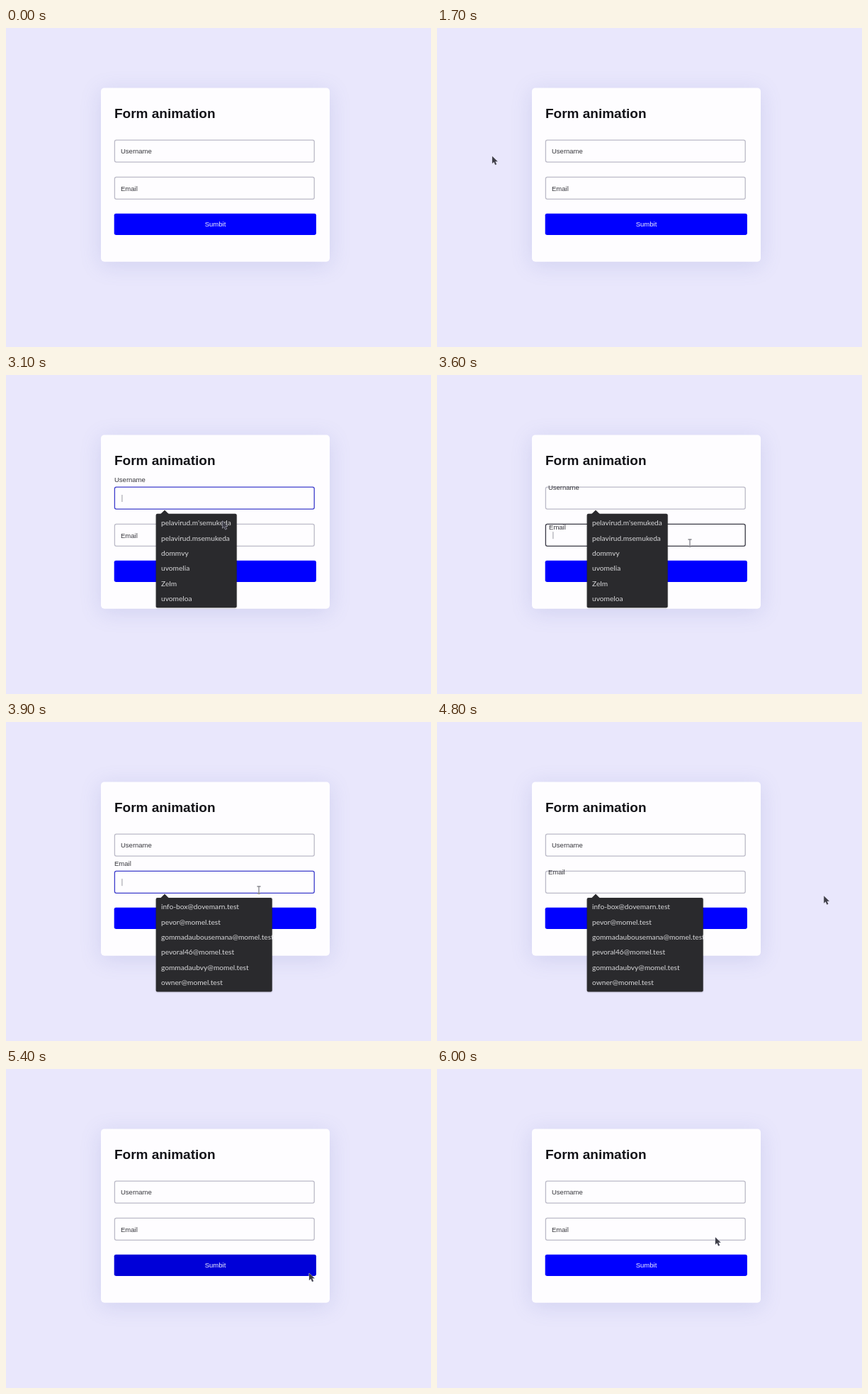
An HTML page with a canvas that plays this animation: 600x450 px, repeating every 6.1 s.

```html
<!DOCTYPE html>
<html lang="en">
<head>
<meta charset="utf-8">
<title>Form animation</title>
<style>
  html, body { margin: 0; width: 100%; height: 100%; overflow: hidden; background: #e9e7fc; }
  canvas { display: block; }
</style>
</head>
<body>
<canvas id="stage" width="600" height="450"></canvas>
<script>
const ctx = document.getElementById('stage').getContext('2d');
const LOOP = 6100, STEP = 100, FLOAT_TIME = 300, POPUP_DELAY = 110;
const SANS = '"Liberation Sans", Arial, sans-serif';
const INK = '#36363c', POPUP = '#2a2a2d';

const fields = [
  { label: 'Username', top: 158, focus: 2390, blur: 3525, popupWidth: 114,
    hints: ["pelavirud.m'semukeda", 'pelavirud.msemukeda', 'dommvy', 'uvomelia', 'Zelm', 'uvomeloa'] },
  { label: 'Email', top: 210.2, focus: 3525, blur: 4725, popupWidth: 164,
    hints: ['info-box@dovemarn.test', 'pevor@momel.test', 'gommadaubousemana@momel.test',
            'pevoral46@momel.test', 'gommadaubvy@momel.test', 'owner@momel.test'] }
];

// Pointer gestures, each starting where the last one ended
const APPEAR = 900;
const gestures = [
  { start: 900, end: 1000, x: 74, y: 185 },
  { start: 1600, end: 1700, x: 78, y: 181 },
  { start: 1700, end: 2000, x: 254, y: 175 },
  { start: 2800, end: 3400, x: 357, y: 237 },
  { start: 4100, end: 4600, x: 574, y: 240, lift: 137 },
  { start: 4700, end: 5000, x: 467, y: 261 },
  { start: 5000, end: 5400, x: 428, y: 288 },
  { start: 5400, end: 5500, x: 396, y: 288 },
  { start: 5700, end: 6000, x: 393, y: 237.5 }
];

const clamp = x => Math.min(1, Math.max(0, x));
const easeOut = x => 1 - (1 - clamp(x)) ** 2;
const smooth = x => clamp(x) ** 2 * (3 - 2 * clamp(x));

function pointerAt(t) {
  if (t < APPEAR) return null;
  let x = 100, y = 185;
  for (const g of gestures) {
    const k = smooth((t - g.start) / (g.end - g.start));
    x += (g.x - x) * k;
    y += (g.y - y) * k - (g.lift || 0) * Math.sin(Math.PI * k);
  }
  return { x, y };
}

function box(x, y, w, h, r, fill) {
  ctx.beginPath();
  ctx.roundRect(x, y, w, h, r);
  if (fill) {
    ctx.fillStyle = fill;
    ctx.fill();
  }
}

function text(str, x, y, font, color, align = 'left') {
  ctx.font = font;
  ctx.fillStyle = color;
  ctx.textAlign = align;
  ctx.fillText(str, x, y);
}

function shadow(color, blur, dy) {
  ctx.shadowColor = color;
  ctx.shadowBlur = blur;
  ctx.shadowOffsetY = dy;
}

function drawCard(hover) {
  ctx.fillStyle = '#e9e7fc';
  ctx.fillRect(0, 0, 600, 450);
  ctx.save();
  shadow('rgba(100, 110, 190, 0.18)', 30, 5);
  box(134, 84.4, 323, 245.4, 5, '#fefdff');
  ctx.restore();
  text('Form animation', 153, 127.4, 'bold 19px ' + SANS, '#131318');
  box(152.7, 261.8, 285.2, 30.2, 2.4, hover ? '#0000d8' : '#0000ff');
  text('Sumbit', 295.5, 280.2, '9.5px ' + SANS, '#f4f4ff', 'center');
}

function drawField({ label, top, focus, blur }, t) {
  const rise = easeOut((t - focus) / FLOAT_TIME) - easeOut((t - blur) / FLOAT_TIME);
  const focused = t >= focus && t < blur;
  box(153.4, top + 0.1, 281.8, 31, 2.4);
  ctx.lineWidth = 1.3;
  ctx.strokeStyle = !focused ? '#bbbac7' : rise > 0.95 ? '#3c3ccb' : '#3a3a45';
  ctx.stroke();
  text(label, 162 - 9 * rise, top + 19.4 - 26.8 * rise, '9.5px ' + SANS, INK);
  if (focused) {
    ctx.fillStyle = '#9a9aa3';
    ctx.fillRect(163.4, top + 11, 1, 10);
  }
}

function drawPopup({ top, focus, blur, popupWidth, hints }, t) {
  if (t < focus + POPUP_DELAY || t >= blur + POPUP_DELAY) return;
  const y = top + 37.8;
  ctx.save();
  shadow('rgba(0, 0, 0, 0.3)', 2, 0.5);
  box(211.7, y, popupWidth, 132.5, 2, POPUP);
  ctx.restore();
  ctx.beginPath();
  ctx.moveTo(218, y + 0.5);
  ctx.lineTo(224, y - 5.4);
  ctx.lineTo(230, y + 0.5);
  ctx.fillStyle = POPUP;
  ctx.fill();
  hints.forEach((hint, i) =>
    text(hint, 219, y + 16.4 + 21.35 * i, '10.2px Lato, "Open Sans", sans-serif', '#d8d8da'));
}

function drawPointer({ x, y }) {
  const overInput = x > 153 && x < 435 && fields.some(f => y > f.top && y < f.top + 27.2);
  ctx.save();
  ctx.translate(x, y);
  if (overInput) {
    ctx.strokeStyle = '#86868d';
    ctx.lineWidth = 1.3;
    ctx.stroke(new Path2D('M-2.5-5H2.5M0-5V5M-2 5H2'));
  } else {
    const arrow = new Path2D('M0 0V10L2.4 7.8L4.2 12L6 11.2L4.2 7.2H7.5Z');
    ctx.strokeStyle = '#c9c8d8';
    ctx.lineWidth = 1;
    ctx.stroke(arrow);
    ctx.fillStyle = '#3e3e47';
    ctx.fill(arrow);
  }
  ctx.restore();
}

function draw(t) {
  const pointer = pointerAt(t);
  const hover = pointer && pointer.x > 153 && pointer.x < 438 && pointer.y > 262 && pointer.y < 292;
  drawCard(hover);
  fields.forEach(field => drawField(field, t));
  fields.forEach(field => drawPopup(field, t));
  if (pointer) drawPointer(pointer);
}

const start = performance.now();
function tick() {
  const t = (performance.now() - start) % LOOP;
  draw(Math.floor(t / STEP) * STEP);
  requestAnimationFrame(tick);
}
tick();
</script>
</body>
</html>
```
